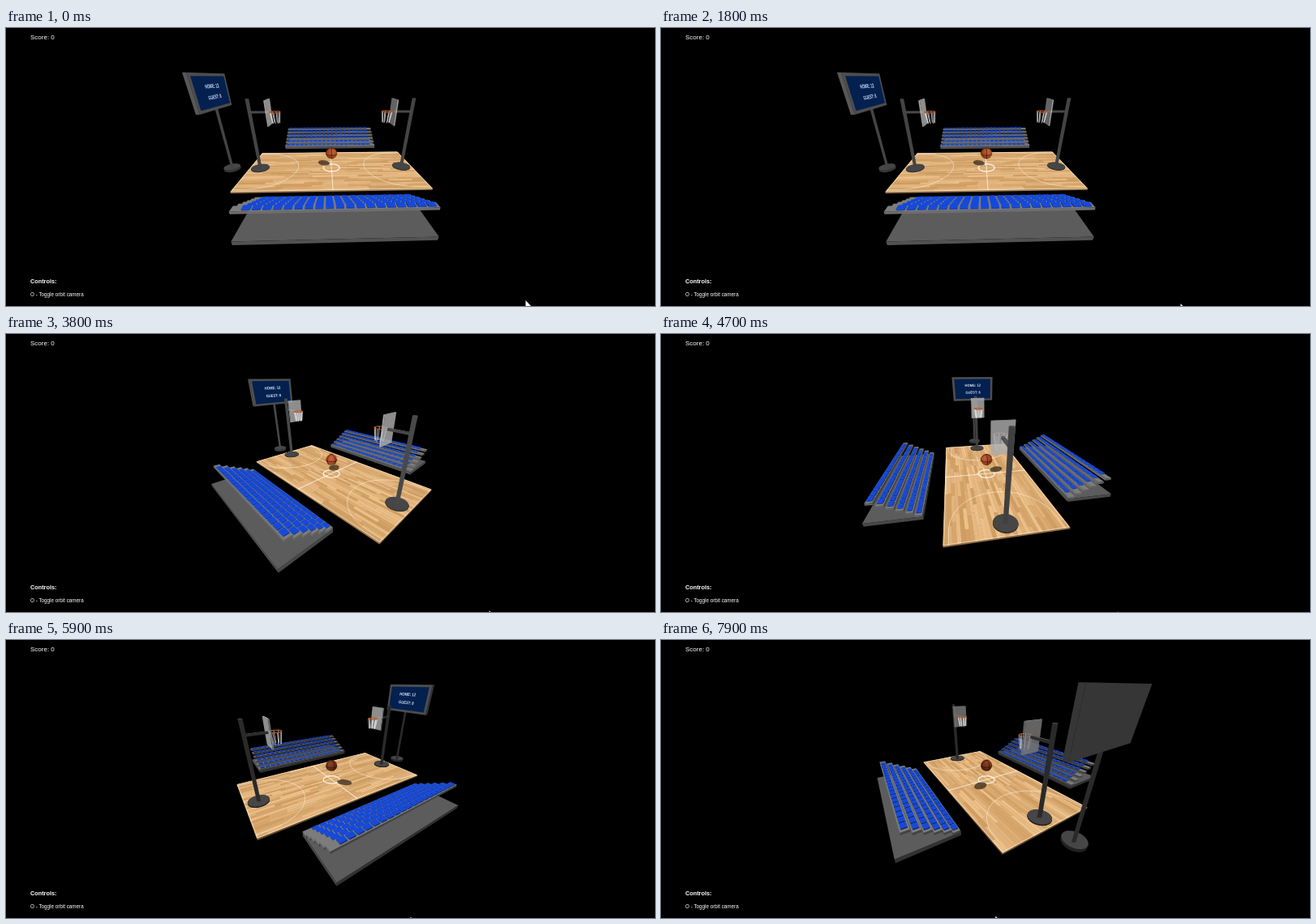
An HTML page with a canvas for the animation above (8 s loop, 800 px wide and 343 px high).

```html
<!DOCTYPE html>
<html lang="en">
<head>
<meta charset="utf-8">
<title>Basketball court</title>
<style>
  html, body { margin: 0; width: 100%; height: 100%; overflow: hidden; background: #000; }
  canvas { position: absolute; left: 0; top: 0; }
  p { position: absolute; left: 30px; margin: 0; color: #fff; white-space: nowrap; line-height: 10px;
      font-family: "Liberation Sans", Arial, sans-serif; }
  #score { top: 7px; font-size: 8px; }
  #title { top: 308px; font-size: 7.3px; font-weight: bold; }
  #help { top: 324px; font-size: 6.3px; }
</style>
</head>
<body>
<canvas id="stage" width="800" height="343"></canvas>
<p id="score">Score: 0</p>
<p id="title">Controls:</p>
<p id="help">O - Toggle orbit camera</p>
<script>
const ctx = document.getElementById('stage').getContext('2d');
const W = 800, H = 343, LOOP = 8000, STEP = 100;
const MID_X = 401.2, MID_Y = 172.2;
const FOCAL = H / 2 / Math.tan(37.5 * Math.PI / 180);
const DIST = Math.hypot(15, 30);
const DRAG = 2 * Math.PI / H;
const PITCH = Math.atan2(15, 30);
const START = -0.03;

// time, azimuth, pitch
const orbit = [
  [1800, START, PITCH], [2700, 0.18, PITCH], [2900, 0.255, PITCH], [3600, 0.66, 0.48],
  [4700, 1.39, 0.505], [5900, 2.57, 0.492], [7000, 3.28, 0.484], [7900, 4.15, 0.472]
];

const LIGHT = unit([10, 20, 15]);
const AMBIENT = 0.48, DIFFUSE = 0.55;
const GREY = [140, 140, 140], SLAB = [104, 104, 104], BLUE = [22, 82, 246];
const POLE = [92, 92, 92], FRAME = [112, 112, 112], WOOD = [205, 160, 108];

let sinA, cosA, sinP, cosP, cam;

function unit(v) { const n = Math.hypot(...v); return v.map(c => c / n); }
function dot(a, b) { return a[0] * b[0] + a[1] * b[1] + a[2] * b[2]; }
function rgb(c, k = 1) { return `rgb(${c.map(v => Math.min(255, Math.round(v * k))).join(',')})`; }
function lit(n) { return AMBIENT + DIFFUSE * Math.max(0, dot(n, LIGHT)); }

function aim(a, p) {
  sinA = Math.sin(a); cosA = Math.cos(a); sinP = Math.sin(p); cosP = Math.cos(p);
  cam = [DIST * cosP * sinA, DIST * sinP, DIST * cosP * cosA];
}

// nearness to the camera along the ground
const near = (x, z) => x * sinA + z * cosA;

function project([x, y, z]) {
  const w = near(x, z);
  const s = FOCAL / (DIST - cosP * w - sinP * y);
  return [MID_X + s * (x * cosA - z * sinA), MID_Y - s * (y * cosP - w * sinP), s];
}

function trace(points, closed = true) {
  ctx.beginPath();
  for (const p of points) { const q = project(p); ctx.lineTo(q[0], q[1]); }
  if (closed) ctx.closePath();
}
function fill(points, color) { trace(points); ctx.fillStyle = color; ctx.fill(); }
function stroke(points, color, width, closed = false) {
  trace(points, closed);
  ctx.strokeStyle = color; ctx.lineWidth = width; ctx.stroke();
}

function arc(cx, y, cz, r, from = 0, to = 2 * Math.PI, n = 32) {
  return Array.from({ length: n + 1 }, (_, i) => {
    const a = from + (to - from) * i / n;
    return [cx + r * Math.cos(a), y, cz + r * Math.sin(a)];
  });
}

function box(center, size, color, alpha = 1) {
  ctx.globalAlpha = alpha;
  for (let axis = 0; axis < 3; axis++) {
    const side = Math.sign(cam[axis] - center[axis]);
    if (Math.abs(cam[axis] - center[axis]) <= size[axis] / 2) continue;
    const b = (axis + 1) % 3, c = (axis + 2) % 3;
    const n = [0, 0, 0];
    n[axis] = side;
    const face = [[-1, -1], [1, -1], [1, 1], [-1, 1]].map(([i, j]) => {
      const p = [...center];
      p[axis] += side * size[axis] / 2;
      p[b] += i * size[b] / 2;
      p[c] += j * size[c] / 2;
      return p;
    });
    fill(face, rgb(color, lit(n)));
  }
  ctx.globalAlpha = 1;
}

function pole(x, z, top, r) {
  const a = project([x, 0, z]), b = project([x, top, z]);
  const ra = r * a[2], rb = r * b[2];
  ctx.fillStyle = rgb(POLE, lit([sinA, 0, cosA]) * 0.95);
  ctx.beginPath();
  ctx.moveTo(a[0] - ra, a[1]); ctx.lineTo(a[0] + ra, a[1]);
  ctx.lineTo(b[0] + rb, b[1]); ctx.lineTo(b[0] - rb, b[1]);
  ctx.fill();
  fill(arc(x, top, z, r, 0, 2 * Math.PI, 12), rgb(POLE, lit([0, 1, 0])));
}

function disc(x, z, r, h) {
  const side = rgb(POLE, lit([sinA, 0, cosA]) * 0.75);
  for (let i = 0; i < 5; i++) fill(arc(x, h * i / 5, z, r), side);
  fill(arc(x, h, z, r), rgb(POLE, 0.76));
}

let seed = 7;
function random() { seed = (seed * 16807) % 2147483647; return seed / 2147483647; }

const PLANK = 0.5;
const planks = [];
for (let row = 0; row < 30; row++) {
  for (let x = -15; x < 15;) {
    const to = Math.min(15, x + 2 + random() * 6);
    const t = random();
    planks.push({ z: row * PLANK - 7.5, from: x, to,
                  color: rgb([206 + 34 * t, 156 + 40 * t, 96 + 46 * t]) });
    x = to;
  }
}

function court() {
  box([0, -0.12, 0], [30, 0.24, 15], WOOD);
  for (const { z, from, to, color } of planks) {
    fill([[from, 0, z], [to, 0, z], [to, 0, z + PLANK], [from, 0, z + PLANK]], color);
  }
  const edge = [[-14.9, 0, -7.4], [14.9, 0, -7.4], [14.9, 0, 7.4], [-14.9, 0, 7.4]];
  stroke(edge, 'rgba(255,245,220,.6)', 0.9, true);
  stroke([[0, 0, -7.5], [0, 0, 7.5]], 'rgba(255,250,238,.7)', 1.1);
  stroke(arc(0, 0, 0, 1.5), 'rgba(255,250,240,.9)', 1.3, true);
  for (const s of [-1, 1]) {
    const curve = arc(0, 0, 0, 6.9, -Math.PI / 2, Math.PI / 2).map(([x, y, z]) => [s * (13 - x), y, z]);
    stroke([[s * 15, 0, -6.9], ...curve, [s * 15, 0, 6.9]], 'rgba(255,248,230,.55)', 0.9);
  }
}

const BALL = [0, 2.83, 0];

function ballShadow() {
  const k = BALL[1] / LIGHT[1];
  const cx = -LIGHT[0] * k, cz = -LIGHT[2] * k;
  const flat = Math.hypot(LIGHT[0], LIGHT[2]);
  const dx = LIGHT[0] / flat, dz = LIGHT[2] / flat;
  const oval = arc(0, 0, 0, 1).map(([a, , b]) => {
    const l = a / LIGHT[1];
    return [cx + l * dx - b * dz, 0, cz + l * dz + b * dx];
  });
  fill(oval, 'rgba(48,34,20,.72)');
}

function ball() {
  const [x, y, r] = project(BALL);
  const toCam = unit(cam.map((c, i) => c - BALL[i]));
  const lx = LIGHT[0] * cosA - LIGHT[2] * sinA;
  const ly = LIGHT[1] * cosP - near(LIGHT[0], LIGHT[2]) * sinP;
  const hx = x + lx * r * 0.6, hy = y - ly * r * 0.6;
  const shade = ctx.createRadialGradient(hx, hy, 0, hx, hy, r * 1.7);
  const glow = 0.64 + 0.36 * Math.max(0, dot(LIGHT, toCam));
  shade.addColorStop(0, rgb([212, 108, 58], glow));
  shade.addColorStop(0.5, rgb([176, 78, 38], glow));
  shade.addColorStop(1, rgb([88, 38, 18], glow));
  ctx.fillStyle = shade;
  ctx.beginPath();
  ctx.arc(x, y, r, 0, 2 * Math.PI);
  ctx.fill();
  const seams = [(c, s) => [c, s, 0], (c, s) => [c, 0, s], (c, s) => [0, c, s]];
  for (const seam of seams) {
    const shown = [];
    const turn = Math.PI / 16;
    let first = 0;
    const at = i => seam(Math.cos(i * turn), Math.sin(i * turn));
    while (first < 32 && !(dot(at(first), toCam) > 0 && dot(at(first - 1), toCam) <= 0)) first++;
    for (let i = first; i < first + 32 && dot(at(i), toCam) > 0; i++) {
      shown.push(at(i).map((c, j) => c + BALL[j]));
    }
    stroke(shown, 'rgba(40,16,8,.8)', 0.8);
  }
}

function basket(x) {
  for (let i = 0; i < 8; i++) {
    const a = i * Math.PI / 4, c = Math.cos(a), s = Math.sin(a);
    stroke([[x + 0.8 * c, 10, 0.8 * s], [x + 0.55 * c, 8.25, 0.55 * s]], 'rgba(240,240,240,.8)', 0.9);
  }
  stroke(arc(x, 10, 0, 0.82), '#b4592c', 1.1, true);
}

function hoop(s) {
  disc(s * 13, 0, 1.55, 0.2);
  const parts = [
    () => pole(s * 13, 0, 12, 0.3),
    () => box([s * 11.5, 10, 0], [3, 0.32, 0.32], POLE),
    () => box([s * 10, 9.95, 0], [0.2, 3.9, 2.7], [252, 252, 252], 0.82),
    () => basket(s * 9)
  ];
  if (s * cam[0] > 10) parts.reverse();
  parts.forEach(draw => draw());
}

const STAND = 20.8;

function stand(s) {
  box([0, 0.25, s * 13.5], [STAND, 0.5, 7], SLAB);
  const rows = [0, 1, 2, 3, 4, 5];
  if (s * cam[2] < 13) rows.reverse();
  const seats = Array.from({ length: 19 }, (_, i) => s * (0.4 + 1.03 * (i - 9)));
  seats.sort((a, b) => Math.abs(b - cam[0]) - Math.abs(a - cam[0]));
  for (const i of rows) {
    const y = 0.65 + i * 0.51, z = s * (10.5 + i);
    box([0, y, z], [STAND, 0.3, 0.9], GREY);
    for (const x of seats) box([x, y + 0.24, z], [0.8, 0.18, 0.62], BLUE);
  }
}

const SCREEN = -17.74;

function label(text, y) {
  const at = (dy, z) => project([SCREEN, y + dy, z]);
  const o = at(0, 0), l = at(0, 1), r = at(0, -1), t = at(0.5, 0), b = at(-0.5, 0);
  const k = 50;
  ctx.save();
  ctx.setTransform((r[0] - l[0]) / 2 / k, (r[1] - l[1]) / 2 / k, (b[0] - t[0]) / k, (b[1] - t[1]) / k, o[0], o[1]);
  ctx.font = 'bold 39px "Liberation Sans", Arial, sans-serif';
  ctx.textAlign = 'center';
  ctx.textBaseline = 'middle';
  ctx.fillStyle = '#d4e4ff';
  ctx.fillText(text, 0, 0);
  ctx.restore();
}

function scoreboard() {
  disc(-18, 0, 1.35, 0.45);
  pole(-18, 0, 10.6, 0.24);
  box([-18, 13, 0], [0.5, 5, 9.3], FRAME);
  if (cam[0] < SCREEN) return;
  const face = [[-1, -1], [1, -1], [1, 1], [-1, 1]].map(([i, j]) => [SCREEN, 13 + 2.1 * i, 4.15 * j]);
  fill(face, '#03204f');
  label('HOME: 12', 13.75);
  label('GUEST: 8', 12.25);
}

const things = [
  { x: 0, z: 13, draw: () => stand(1) },
  { x: 0, z: -13, draw: () => stand(-1) },
  { x: 12, z: 0, draw: () => hoop(1) },
  { x: -12, z: 0, draw: () => hoop(-1) },
  { x: -18, z: 0, draw: scoreboard },
  { x: 0, z: 0, draw: ball }
];

function cursor(x, y) {
  const shape = [[0, 0], [0, 11], [2.6, 8.6], [4.5, 12.5], [6, 11.8], [4.2, 8], [7.6, 8]];
  ctx.beginPath();
  for (const [dx, dy] of shape) ctx.lineTo(x + dx, y + dy);
  ctx.fillStyle = '#fff';
  ctx.fill();
}

function pose(t) {
  if (t <= orbit[0][0]) return orbit[0].slice(1);
  const i = orbit.findIndex(k => k[0] >= t);
  const a = orbit[i - 1], b = orbit[i];
  const f = (t - a[0]) / (b[0] - a[0]);
  return [1, 2].map(j => a[j] + (b[j] - a[j]) * f);
}

function render(t) {
  const [azimuth, pitch] = pose(t);
  aim(azimuth, pitch);
  ctx.fillStyle = '#000';
  ctx.fillRect(0, 0, W, H);
  ctx.lineJoin = 'round';
  court();
  ballShadow();
  things.sort((a, b) => near(a.x, a.z) - near(b.x, b.z));
  things.forEach(thing => thing.draw());
  const settle = Math.min(1, Math.max(0, (t - 1000) / 800));
  cursor(640.5 - (azimuth - START) / DRAG, 336 + 4 * settle + (pitch - PITCH) / DRAG);
}

const begin = performance.now();
function tick() {
  const t = (performance.now() - begin) % LOOP;
  render(Math.floor(t / STEP) * STEP);
  requestAnimationFrame(tick);
}
tick();
</script>
</body>
</html>
```
